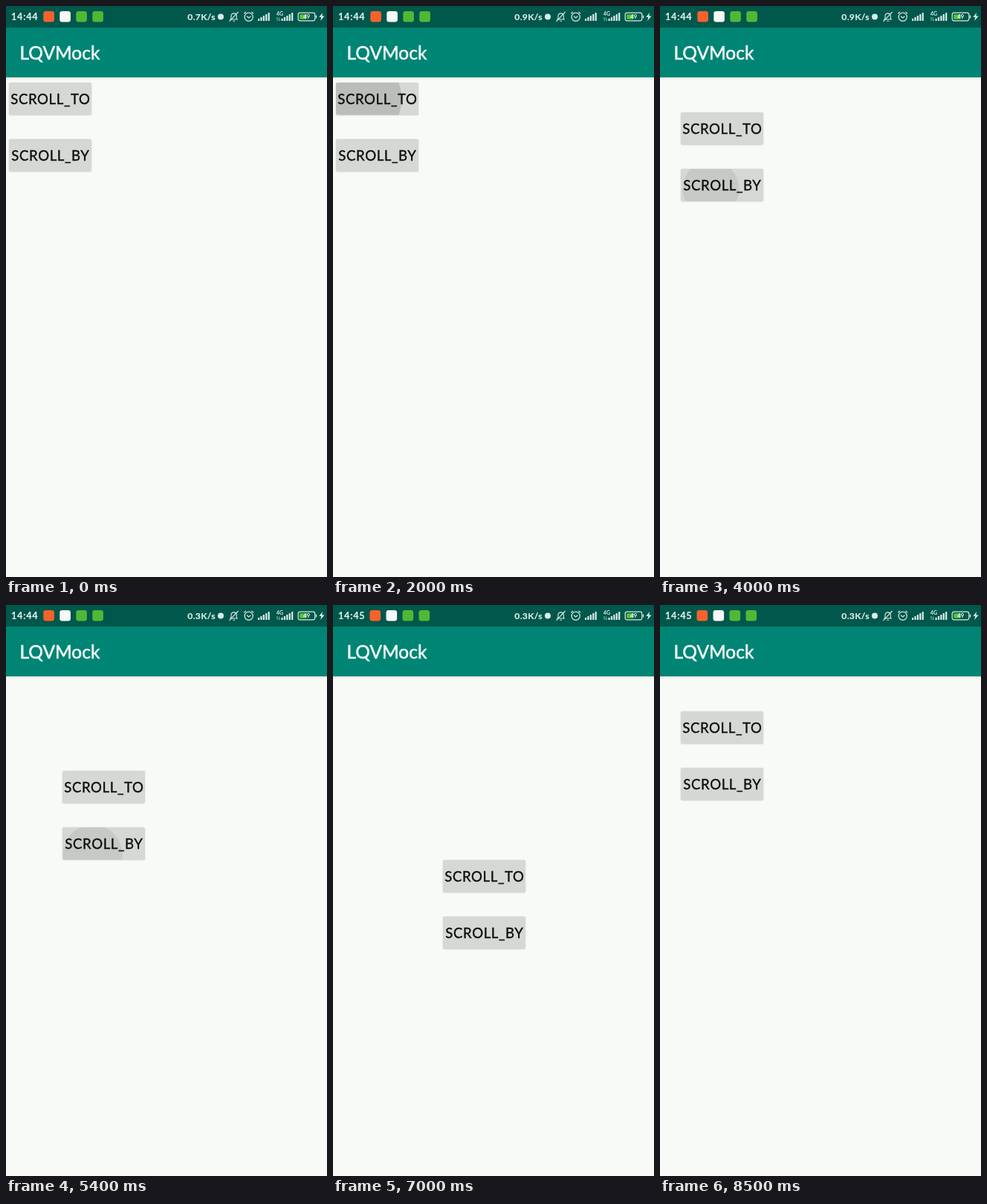
Write an HTML page with a canvas that moves like this. It is 432 px wide and 768 px high and loops after 8.8 s.

```html
<!DOCTYPE html>
<html lang="en">
<head>
<meta charset="utf-8">
<title>Scroll buttons</title>
<style>
html, body { margin: 0; width: 100%; height: 100%; overflow: hidden; background: #f8faf7; }
canvas { display: block; }
</style>
</head>
<body>
<canvas id="stage" width="432" height="768"></canvas>
<script>
const ctx = document.getElementById('stage').getContext('2d');
const LOOP = 8800, TICK = 100;
const HOLD = 200, FADE = 250, GROW = 160;
const STEP = { x: 24, y: 40 };
const PALE = '#dcebe7';

const BUTTONS = {
  to: { label: 'SCROLL_TO', y: 103, shade: 0.125 },
  by: { label: 'SCROLL_BY', y: 179, shade: 0.07 }
};
const BOX = { x: 4, w: 111, h: 43.6 };

// Each tap: start time, button, touch offset from the button centre, first radius.
const TAPS = [
  { at: 2000, key: 'to', dx: -26, dy: 0, r: 59 },
  { at: 3000, key: 'to', dx: -24, dy: 2, r: 57 },
  { at: 4000, key: 'by', dx: -15, dy: 5, r: 38 },
  { at: 4400, key: 'by', dx: -15, dy: 8, r: 38 },
  { at: 5400, key: 'by', dx: -15, dy: 15, r: 40 },
  { at: 5900, key: 'by', dx: -14, dy: 12, r: 40 },
  { at: 6400, key: 'by', dx: -12, dy: 10, r: 40 },
  { at: 7200, key: 'by', dx: -12, dy: 8, r: 40 },
  { at: 8000, key: 'to', dx: -20, dy: 4, r: 50 }
];

function fillRound(x, y, w, h, r, color) {
  ctx.fillStyle = color;
  ctx.beginPath();
  ctx.roundRect(x, y, w, h, r);
  ctx.fill();
}

function strokePath(d, width, color = PALE) {
  ctx.strokeStyle = color;
  ctx.lineWidth = width;
  ctx.stroke(new Path2D(d));
}

function text(str, x, y, font, color, { align = 'left', spacing = 0, bold = 0 } = {}) {
  ctx.font = font + ' Lato, "Open Sans", sans-serif';
  ctx.letterSpacing = spacing + 'px';
  ctx.textAlign = align;
  ctx.fillStyle = color;
  ctx.fillText(str, x, y);
  if (bold) {
    ctx.strokeStyle = color;
    ctx.lineWidth = bold;
    ctx.strokeText(str, x, y);
  }
  ctx.letterSpacing = '0px';
}

function scrollSteps(t) {
  let n = 0;
  for (const tap of TAPS) {
    if (t >= tap.at + HOLD) n = tap.key === 'to' ? 1 : n + 1;
  }
  return n;
}

function drawRipple(tap, t, button) {
  const age = t - tap.at;
  if (age < 0 || age > HOLD + FADE) return;
  const grow = Math.min(1, age / GROW);
  const fade = 1 - Math.max(0, age - HOLD) / FADE;
  const cx = BOX.x + BOX.w / 2 + tap.dx * (1 - grow);
  const cy = button.y + BOX.h / 2 + tap.dy * (1 - grow);
  ctx.fillStyle = `rgba(0,0,0,${button.shade * fade})`;
  ctx.beginPath();
  ctx.arc(cx, cy, tap.r + (61 - tap.r) * grow, 0, Math.PI * 2);
  ctx.fill();
}

function drawButton(key, t) {
  const b = BUTTONS[key];
  ctx.save();
  ctx.shadowColor = 'rgba(0,0,0,0.16)';
  ctx.shadowBlur = 2;
  ctx.shadowOffsetY = 0.5;
  fillRound(BOX.x, b.y, BOX.w, BOX.h, 2, '#d6d8d5');
  ctx.restore();

  ctx.save();
  ctx.beginPath();
  ctx.roundRect(BOX.x, b.y, BOX.w, BOX.h, 2);
  ctx.clip();
  for (const tap of TAPS) if (tap.key === key) drawRipple(tap, t, b);
  ctx.restore();

  text(b.label, BOX.x + BOX.w / 2 + 0.4, b.y + 28.7, '18.6px', '#0c0d0c',
    { align: 'center', spacing: 0.6, bold: 0.35 });
}

function drawSignal(x) {
  for (let i = 0; i < 5; i++) {
    const h = 3 + i * 2;
    fillRound(x + i * 3.4, 20 - h, 2.2, h, 0.6, PALE);
  }
}

function drawBell() {
  strokePath('M301 18H312 M303 18V13a3.7 3.7 0 0 1 7.3 0V18 M305.5 20.3H308', 1.1);
  strokePath('M312.6 8L300.5 20.8', 1.1);
}

function drawAlarm() {
  strokePath('M332.3 14.8a5.6 5.6 0 1 1-11.2 0a5.6 5.6 0 1 1 11.2 0', 1.2);
  strokePath('M320.3 10.2L323 8 M330.4 8L333.1 10.2 M324 13.7L326.7 16L329.4 13.7', 1.2);
}

function drawBattery() {
  ctx.strokeStyle = PALE;
  ctx.lineWidth = 1.2;
  ctx.beginPath();
  ctx.roundRect(393.2, 9.2, 22.6, 10.6, 2.5);
  ctx.stroke();
  fillRound(395.2, 11.2, 9.3, 6.6, 1, '#55c43c');
  fillRound(416.8, 12.5, 1.4, 4, 0.5, PALE);
  text('49', 404.7, 17.2, 'bold 7.6px', '#fff', { align: 'center' });
  ctx.fillStyle = PALE;
  ctx.fill(new Path2D('M426 9L421.3 15H424.3L423.2 20L428.5 13.5H425.3Z'));
}

function drawStatus(t) {
  const late = t >= 6300;
  const rate = t < 1000 ? '0.7K/s' : t < 4800 ? '0.9K/s' : '0.3K/s';
  ctx.fillStyle = '#00574b';
  ctx.fillRect(0, 0, 432, 29);

  text(late ? '14:45' : '14:44', 7, 19, 'bold 12.6px', PALE, { spacing: 0.8, bold: 0.2 });
  ['#f4622d', '#f7faf7', '#4fb936', '#4fb936'].forEach((color, i) =>
    fillRound(50.3 + i * 22 - (late ? 0.8 : 0), 7, 14.6, 14.6, 3.3, color));

  text(rate, 282, 19, 'bold 12.2px', PALE, { align: 'right', spacing: 0.3, bold: 0.2 });
  ctx.fillStyle = PALE;
  ctx.beginPath();
  ctx.arc(289, 14.5, 4, 0, Math.PI * 2);
  ctx.fill();

  drawBell();
  drawAlarm();
  drawSignal(339);
  text('4G', 364, 12.6, 'bold 7px', PALE);
  strokePath('M365.2 20V15.5 M364 17L365.2 15.5 M367.6 15.5V20 M368.8 18.5L367.6 20', 0.8, '#9fc4bc');
  drawSignal(370.5);
  drawBattery();
}

function drawToolbar() {
  const shadow = ctx.createLinearGradient(0, 96, 0, 100);
  shadow.addColorStop(0, 'rgba(0,0,0,0.08)');
  shadow.addColorStop(1, 'rgba(0,0,0,0)');
  ctx.fillStyle = shadow;
  ctx.fillRect(0, 96, 432, 4);
  ctx.fillStyle = '#008575';
  ctx.fillRect(0, 29, 432, 67);
  text('LQVMock', 18.5, 71.8, '24.5px', '#fafffd', { bold: 0.5 });
}

function draw(t) {
  ctx.fillStyle = '#f8faf7';
  ctx.fillRect(0, 0, 432, 768);
  const n = scrollSteps(t);
  ctx.save();
  ctx.translate(n * STEP.x, n * STEP.y);
  drawButton('to', t);
  drawButton('by', t);
  ctx.restore();
  drawToolbar();
  drawStatus(t);
}

const start = performance.now();
function frame() {
  const t = (performance.now() - start) % LOOP;
  draw(Math.floor(t / TICK) * TICK);
  requestAnimationFrame(frame);
}
frame();
</script>
</body>
</html>
```
